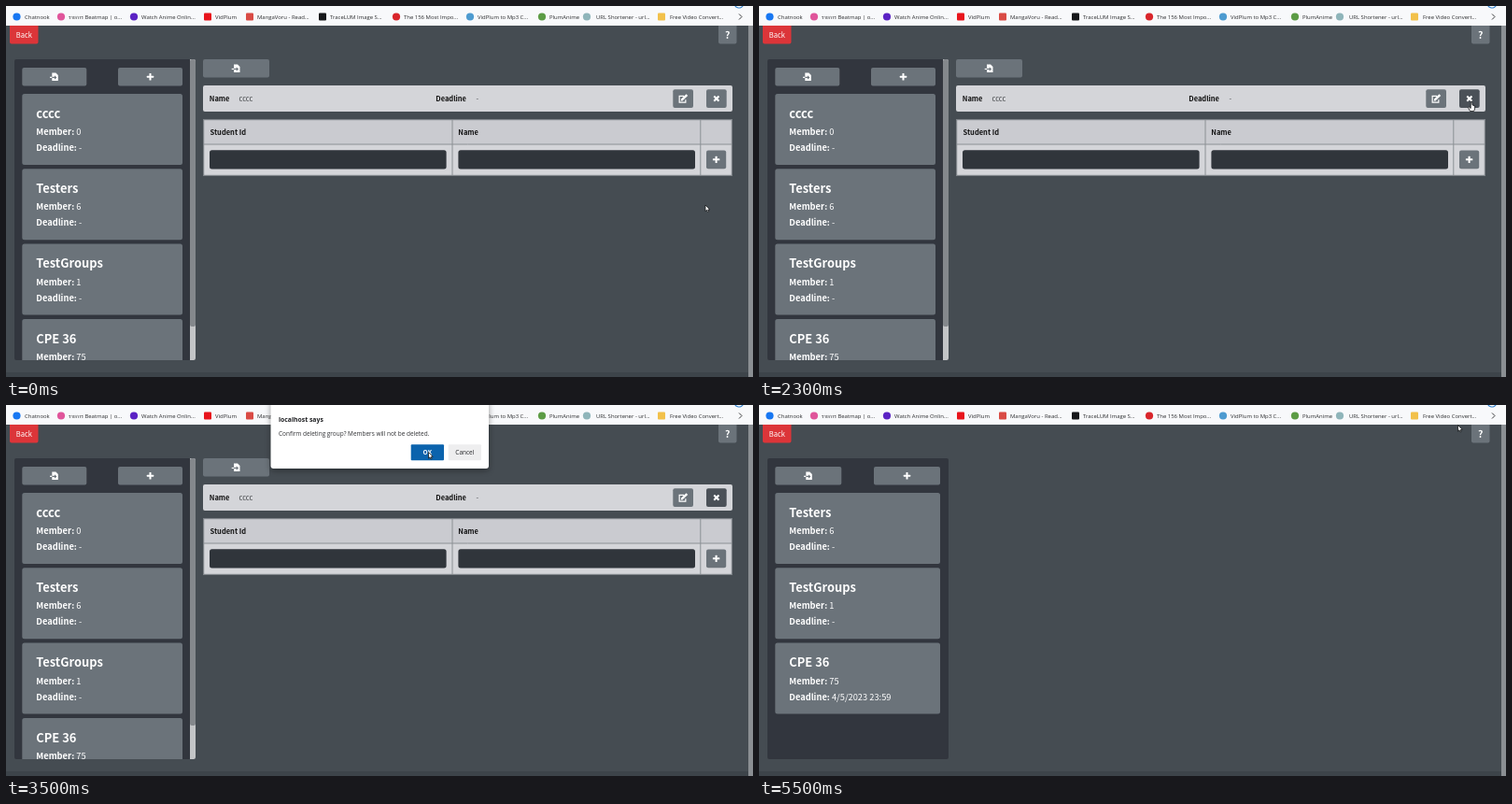
These frames come from a looping animation (800x397 px, 5700 ms). An HTML page with a canvas:

```html
<!DOCTYPE html>
<html lang="en">
<head>
<meta charset="utf-8">
<title>Group manager</title>
<style>
  html, body { margin: 0; width: 100%; height: 100%; overflow: hidden; background: #454c52; }
  canvas { display: block; width: 800px; height: 397px; }
</style>
</head>
<body>
<canvas id="stage" width="800" height="397"></canvas>
<script>
const ctx = document.getElementById('stage').getContext('2d');
const LOOP = 5700, STEP = 100;
const APP = '"Noto Sans CJK JP", "Noto Sans CJK SC", sans-serif';
const BROWSER = '"Open Sans", "Noto Sans", sans-serif';
const GREY = '#6b737a', DARK = '#32363e', PANEL = '#d4d5d9';
const DELETED_AT = 3600;

function box(x, y, w, h, color, r = 0) {
  ctx.fillStyle = color;
  ctx.beginPath();
  ctx.roundRect(x, y, w, h, r);
  ctx.fill();
}

function text(str, x, y, size, color, { bold = false, font = APP, align = 'left' } = {}) {
  ctx.font = `${bold ? 'bold ' : ''}${size}px ${font}`;
  ctx.textAlign = align;
  ctx.fillStyle = color;
  ctx.fillText(str, x, y);
}

function poly(points, color) {
  ctx.fillStyle = color;
  ctx.beginPath();
  points.forEach(([x, y]) => ctx.lineTo(x, y));
  ctx.closePath();
  ctx.fill();
}

function strokeLine(points, color, width) {
  ctx.strokeStyle = color;
  ctx.lineWidth = width;
  ctx.beginPath();
  points.forEach(([x, y]) => ctx.lineTo(x, y));
  ctx.stroke();
}

function dot(x, y, r, color) {
  ctx.fillStyle = color;
  ctx.beginPath();
  ctx.arc(x, y, r, 0, Math.PI * 2);
  ctx.fill();
}

const icons = {
  plus(x, y) {
    box(x - 3.7, y - 1, 7.4, 2, '#fff', 0.5);
    box(x - 1, y - 3.7, 2, 7.4, '#fff', 0.5);
  },
  close(x, y) {
    strokeLine([[x - 2.6, y - 2.6], [x + 2.6, y + 2.6]], '#fff', 2);
    strokeLine([[x + 2.6, y - 2.6], [x - 2.6, y + 2.6]], '#fff', 2);
  },
  load(x, y) {
    poly([[x - 2.5, y - 4.3], [x + 1.5, y - 4.3], [x + 4, y - 1.8], [x + 4, y + 4.3], [x - 2.5, y + 4.3]], '#fff');
    strokeLine([[x - 4.8, y + 0.7], [x + 0.5, y + 0.7]], '#fff', 1.2);
    strokeLine([[x - 2.5, y + 0.7], [x + 1, y + 0.7]], GREY, 1.2);
    poly([[x + 0.2, y - 1.5], [x + 2.5, y + 0.7], [x + 0.2, y + 2.9]], GREY);
  },
  edit(x, y) {
    strokeLine([[x + 1, y - 2.7], [x - 4, y - 2.7], [x - 4, y + 4], [x + 2.7, y + 4], [x + 2.7, y + 1]], '#fff', 1.2);
    strokeLine([[x - 1.3, y + 1.2], [x + 4.2, y - 4]], '#fff', 2.4);
    poly([[x - 2.5, y + 2.5], [x - 2, y], [x, y + 2]], '#fff');
  }
};

function button(x, y, w, h, icon, color = GREY) {
  box(x, y, w, h, color, 2);
  icons[icon](x + w / 2, y + h / 2);
}

// label, text x, icon x, icon colour, icon shape
const bookmarks = [
  ['Chatnook', 20, 11.5, '#1877f2', 'circle'],
  ['รายการ Beatmap | o...', 67, 59, '#e0559b', 'circle'],
  ['Watch Anime Onlin...', 145, 137, '#5b22c4', 'circle'],
  ['VidPlum', 224, 216, '#e8141c', 'square'],
  ['MangaVoru - Read...', 269, 261, '#d94b45', 'square'],
  ['TraceLUM Image S...', 347, 339, '#17181a', 'square'],
  ['The 156 Most Impo...', 426, 418, '#d9252b', 'circle'],
  ['VidPlum to Mp3 C...', 505, 497, '#4d9bd0', 'circle'],
  ['PlumAnime', 582, 574, '#5c9c45', 'circle'],
  ['URL Shortener - url...', 632, 622, '#8fb5ba', 'circle'],
  ['Free Video Convert...', 711, 702, '#f2c14b', 'square']
];

function browserBar() {
  box(0, 0, 800, 21, '#f8f9fb');
  for (const [label, x, iconX, color, shape] of bookmarks) {
    if (shape === 'circle') dot(iconX, 11.5, 4.1, color);
    else box(iconX - 4, 7.5, 8, 8, color, 1);
    text(label, x, 13.6, 5.95, '#2b2c2e', { font: BROWSER });
  }
  strokeLine([[785, 8.5], [788, 11.5], [785, 14.5]], '#3a3b3d', 1);
  ctx.strokeStyle = '#2f80cf';
  ctx.lineWidth = 1.2;
  ctx.beginPath();
  ctx.arc(785, -3, 5, 0.3, Math.PI - 0.3);
  ctx.stroke();
}

function card(y, width, { name, members, deadline = '-' }) {
  box(17.3, y, width, 76, GREY, 2.5);
  text(name, 32.3, y + 25.8, 12.9, '#fff', { bold: true });
  const rows = [['Member:', members, 44], ['Deadline:', deadline, 61]];
  for (const [label, value, dy] of rows) {
    text(label, 32.3, y + dy, 9.3, '#fff', { bold: true });
    const valueX = 32.3 + ctx.measureText(label + ' ').width;
    text(value, valueX, y + dy, 9.3, '#fff');
  }
}

const groups = [
  { name: 'cccc', members: 0 },
  { name: 'Testers', members: 6 },
  { name: 'TestGroups', members: 1 },
  { name: 'CPE 36', members: 75, deadline: '4/5/2023 23:59' }
];

function sidebar(deleted) {
  const width = deleted ? 176.7 : 171.7;
  const buttonWidth = deleted ? 71 : 69;
  ctx.save();
  ctx.beginPath();
  ctx.roundRect(9, 57, 194, 322, 2);
  ctx.clip();
  box(9, 57, 194, 322, DARK);
  button(17.3, 66, buttonWidth, 19.5, 'load');
  button(17.3 + width - buttonWidth, 66, buttonWidth, 19.5, 'plus');
  groups.slice(deleted ? 1 : 0).forEach((g, i) => card(94 + i * 80.3, width, g));
  if (!deleted) {
    box(197, 57, 6, 322, '#c3c5c7');
    box(197, 57, 6, 286, '#84888c', 2);
  }
  ctx.restore();
}

function details(closeActive) {
  button(211, 57, 71, 19.5, 'load');

  box(211, 85, 567, 28, PANEL, 2);
  text('Name', 217.8, 102, 7.5, '#111', { bold: true });
  text('cccc', 249.5, 102, 7.5, '#44474a');
  text('Deadline', 460.3, 102, 7.5, '#111', { bold: true });
  text('-', 503.5, 102, 7.5, '#44474a');
  button(714.3, 89.3, 21.7, 19.7, 'edit');
  button(750, 89.3, 21.7, 19.7, 'close', closeActive ? '#4b5158' : GREY);

  box(211, 121, 567, 61, PANEL);
  box(211, 121, 567, 27, '#cacbd0');
  ctx.strokeStyle = '#7e8388';
  ctx.lineWidth = 1.2;
  ctx.strokeRect(211.6, 121.6, 565.8, 59.8);
  for (const x of [478, 743.8]) strokeLine([[x, 122], [x, 181]], '#8b9094', 1);
  strokeLine([[212, 148], [777, 148]], '#8b9094', 1);
  text('Student Id', 218.5, 138, 7.5, '#111', { bold: true });
  text('Name', 484.3, 138, 7.5, '#111', { bold: true });
  for (const x of [218, 484.4]) box(x, 154.3, 253.6, 20.2, '#30353b', 2.5);
  button(750, 154.5, 21.2, 19.7, 'plus');
}

function dialog(t) {
  if (t < 2500 || t > DELETED_AT) return;
  const closing = t === DELETED_AT;
  const dy = closing ? -6.5 : t < 2600 ? -8 : t < 2700 ? -2 : 0;
  const hover = t >= 3400;
  ctx.save();
  ctx.translate(0, dy);
  if (closing) {
    box(282.5, -5, 236, 73, 'rgba(143,145,147,.86)', 3);
    ctx.globalAlpha = 0.75;
  } else {
    ctx.globalAlpha = t < 2600 ? 0.65 : 1;
    ctx.shadowColor = 'rgba(0,0,0,.4)';
    ctx.shadowBlur = 6;
    ctx.shadowOffsetY = 2;
    box(283.5, -5, 233.5, 73, '#fff', 3);
    ctx.shadowColor = 'transparent';
  }
  text('localhost says', 292, 17.5, 6.85, '#202124', { bold: true, font: BROWSER });
  text('Confirm deleting group? Members will not be deleted.', 292, 32.6, 6.45, '#303134', { font: BROWSER });
  box(433.7, 42.3, 35.3, 17, hover ? '#0b63ad' : '#0f78d0', 1);
  box(473.7, 42.3, 35.3, 17, closing ? '#838587' : '#eeeeef', 1);
  const centered = { font: BROWSER, align: 'center' };
  text('OK', 451.3, 53.1, 6.45, closing ? '#a9b4be' : '#fff', { ...centered, bold: true });
  text('Cancel', 491.3, 53.1, 6.45, '#26272a', centered);
  ctx.restore();
}

// time, x, y of the pointer tip
const path = [
  [0, 749, 213], [1100, 749, 213], [1800, 768.5, 209.5], [2200, 763, 103],
  [2400, 763, 102], [2600, 775, 100], [2900, 775, 100], [3300, 468, 62],
  [3500, 452.5, 50.5], [3600, 451, 59.5], [4000, 432, 150], [4200, 425, 165],
  [4500, 375.5, 231.5], [4800, 378, 230], [5300, 752, 38], [5500, 748.5, 21.5], [LOOP, 748.5, 21.5]
];

function pointerAt(t) {
  const i = path.findIndex(([time]) => time > t);
  const [t0, x0, y0] = path[i - 1];
  const [t1, x1, y1] = path[i];
  const p = (t - t0) / (t1 - t0);
  const e = p * p * (3 - 2 * p);
  return [x0 + (x1 - x0) * e, y0 + (y1 - y0) * e];
}

function pointer(t) {
  const [x, y] = pointerAt(t);
  ctx.save();
  ctx.translate(x, y);
  ctx.fillStyle = '#fff';
  ctx.strokeStyle = '#15171a';
  ctx.lineWidth = 0.8;
  ctx.lineJoin = 'round';
  const hand = t >= 2200 && t < 3200;
  const outline = hand
    ? [[-0.7, 0], [0.7, 0], [1, 3.4], [3.6, 4.4], [3.6, 7.5], [2.6, 10], [-1.5, 10], [-3.5, 6.2], [-2.5, 5.6], [-0.8, 7]]
    : [[0, 0], [0, 6.6], [1.5, 5.3], [2.5, 7.5], [3.6, 7], [2.7, 5], [4.7, 4.8]];
  ctx.beginPath();
  outline.forEach(([px, py]) => ctx.lineTo(px, py));
  ctx.closePath();
  ctx.fill();
  ctx.stroke();
  ctx.restore();
}

function draw(t) {
  const deleted = t >= DELETED_AT;
  box(0, 0, 800, 397, '#454c52');
  box(0, 392, 795, 5, '#3d444a');
  box(795, 21, 5, 376, '#8b8f93');
  browserBar();
  box(4, 21, 30.5, 19.5, '#dc3539', [0, 0, 2, 2]);
  text('Back', 19.3, 33.7, 7.5, '#fff', { align: 'center' });
  box(763, 21, 19.5, 19.5, GREY, [0, 0, 2, 2]);
  text('?', 772.8, 35, 10.5, '#fff', { bold: true, align: 'center' });
  sidebar(deleted);
  if (!deleted) details(t >= 2200);
  dialog(t);
  pointer(t);
}

function tick() {
  const t = performance.now() % LOOP;
  draw(Math.floor(t / STEP) * STEP);
  requestAnimationFrame(tick);
}
tick();
</script>
</body>
</html>
```
